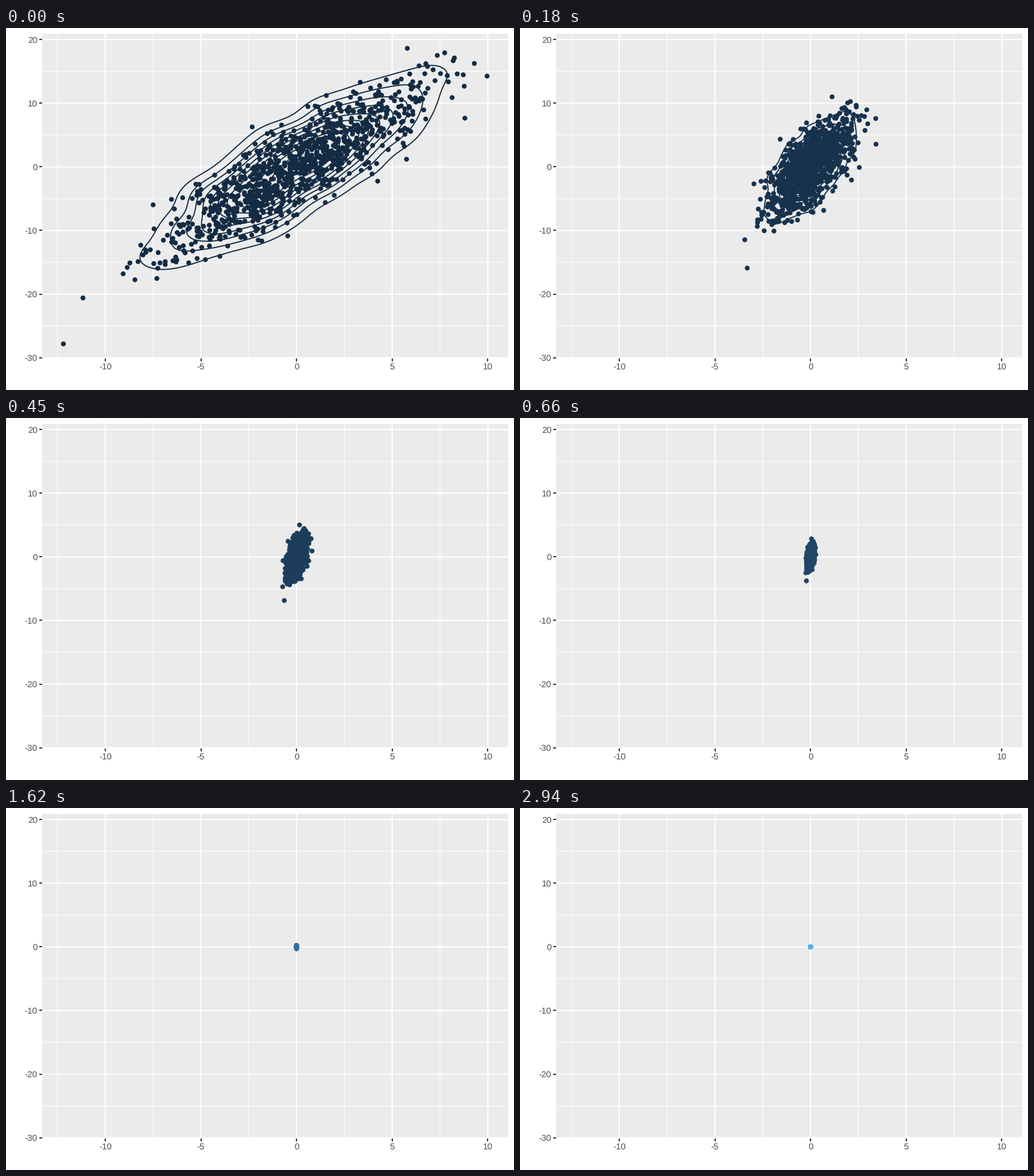
These frames come from a looping animation (885 by 632 pixels, 3000 ms). A matplotlib script:

```python
import numpy as np
import matplotlib
import matplotlib.pyplot as plt
from matplotlib.animation import FuncAnimation

matplotlib.rcParams["font.family"] = "Liberation Sans"
matplotlib.rcParams["text.hinting"] = "none"

WIDTH, HEIGHT, DPI = 885, 632, 100
FRAMES, INTERVAL = 100, 30
PT = 72 / DPI  # points per pixel
LEFT, RIGHT, TOP, BOTTOM = 63.2, 875.4, 9.7, 577.2
ORIGIN = np.array([506.2, 242.4])
SCALE = np.array([33.32, -11.11])

# The most remote points, which also set the reach of the density grid
REMOTE = [(-12.19, -27.82), (-11.17, -20.6), (9.96, 14.26), (5.79, 18.62),
          (8.8, 7.65), (5.75, 1.2), (4.24, -2.25), (-0.46, -10.85),
          (-2.32, 6.27), (-7.5, -5.97)]


def make_points(count=1000, sx=3.55, sy=7.0, rho=0.88):
    """Correlated normal cloud: even radii and jittered golden angles."""
    rng = np.random.default_rng(7)
    i = np.arange(count - len(REMOTE))
    radius = np.sqrt(-2 * np.log(1 - 0.97 * (i + 0.5) / len(i)))
    angle = np.pi * (3 - np.sqrt(5)) * i + rng.normal(0, 0.6, len(i))
    u, v = radius * np.cos(angle), radius * np.sin(angle)
    cloud = np.column_stack([sx * u, sy * (rho * u + np.sqrt(1 - rho**2) * v)])
    return np.vstack([REMOTE, cloud])


START = make_points()
GRID = [np.linspace(START[:, k].min(), START[:, k].max(), 100) for k in (0, 1)]


def ramp(t, scale, power):
    return 1 - np.exp(-(t / scale) ** power)


def positions(t):
    """Both axes decay while each takes up a share of the other."""
    x, y = START.T
    decay_x = np.exp(-0.155 * t**2 / (t + 1.2))
    decay_y = np.exp(-0.075 * t)
    return np.column_stack([decay_x * (x - 0.24 * ramp(t, 4.9, 1.6) * y),
                            decay_y * (y - 0.76 * ramp(t, 12.5, 1.35) * x)])


def color_at(frame):
    u = frame / (FRAMES - 1)
    first, last = np.array([19, 43, 67]), np.array([86, 177, 247])
    sag = 4 * u * (1 - u) * np.array([1, 4, 5])  # perceptual blend runs darker
    return (first + (last - first) * u - sag) / 255


def density(points):
    kernels = []
    for axis, values in zip(GRID, points.T):
        width = 1.06 * values.std() * len(values) ** -0.2
        u = (axis[:, None] - values) / width
        kernels.append(np.exp(-0.5 * u**2) / (width * np.sqrt(2 * np.pi)))
    return kernels[1] @ kernels[0].T / len(points)


def pretty_step(top):
    """Round step that splits 0..top into about ten parts."""
    raw = top / 10
    base = 10.0 ** np.floor(np.log10(raw))
    step = base
    for factor, bias in ((2, 1.5), (5, 2.75), (10, 1.5)):
        if factor * base - raw < bias * (raw - step):
            step = factor * base
    return step


fig = plt.figure(figsize=(WIDTH / DPI, HEIGHT / DPI), dpi=DPI, facecolor="white")
ax = fig.add_axes([LEFT / WIDTH, 1 - BOTTOM / HEIGHT,
                   (RIGHT - LEFT) / WIDTH, (BOTTOM - TOP) / HEIGHT],
                  facecolor="#EBEBEB")
xlim = (np.array([LEFT, RIGHT]) - ORIGIN[0]) / SCALE[0]
ylim = (np.array([BOTTOM, TOP]) - ORIGIN[1]) / SCALE[1]
for spine in ax.spines.values():
    spine.set_visible(False)

X_TICKS, Y_TICKS = range(-10, 11, 5), range(-30, 21, 10)


def grid_lines(draw, values, width):
    for value in values:
        draw(value, color="white", lw=width * PT, zorder=0.5, snap=False)


grid_lines(ax.axvline, np.arange(-12.5, 10, 5), 1.1)
grid_lines(ax.axhline, np.arange(-25, 20, 10), 1.1)
grid_lines(ax.axvline, X_TICKS, 2.1)
grid_lines(ax.axhline, Y_TICKS, 2.1)
ax.set_xticks(X_TICKS, [str(v) for v in X_TICKS])
ax.set_yticks(Y_TICKS, [str(v) for v in Y_TICKS])
ax.tick_params(length=4.8 * PT, width=2.1 * PT, color="#333333",
               labelcolor="#4D4D4D", labelsize=15.3 * PT)
ax.tick_params(axis="x", pad=2.8 * PT)
ax.tick_params(axis="y", pad=3.6 * PT)
ax.set(xlim=xlim, ylim=ylim)

# One size per dot keeps the dots off the pixel grid
dots = ax.scatter(*START.T, s=np.full(len(START), (8.5 * PT) ** 2),
                  linewidths=0, zorder=3)
contours = []


def update(frame):
    while contours:
        contours.pop().remove()
    points, color = positions(frame), color_at(frame)
    dots.set_offsets(points)
    dots.set_facecolor([color])
    z = density(points)
    top = z.max()
    if top > 1e-300:
        step = pretty_step(top) / top
        levels = np.arange(step, 1, step)
        contours.append(ax.contour(*GRID, z / top, levels=levels, colors=[color],
                                   linewidths=2 * PT, zorder=4))
        ax.set(xlim=xlim, ylim=ylim)
    return [dots]


anim = FuncAnimation(fig, update, frames=FRAMES, interval=INTERVAL,
                     init_func=lambda: update(0), repeat=True, repeat_delay=0,
                     blit=False)
plt.show()
```
